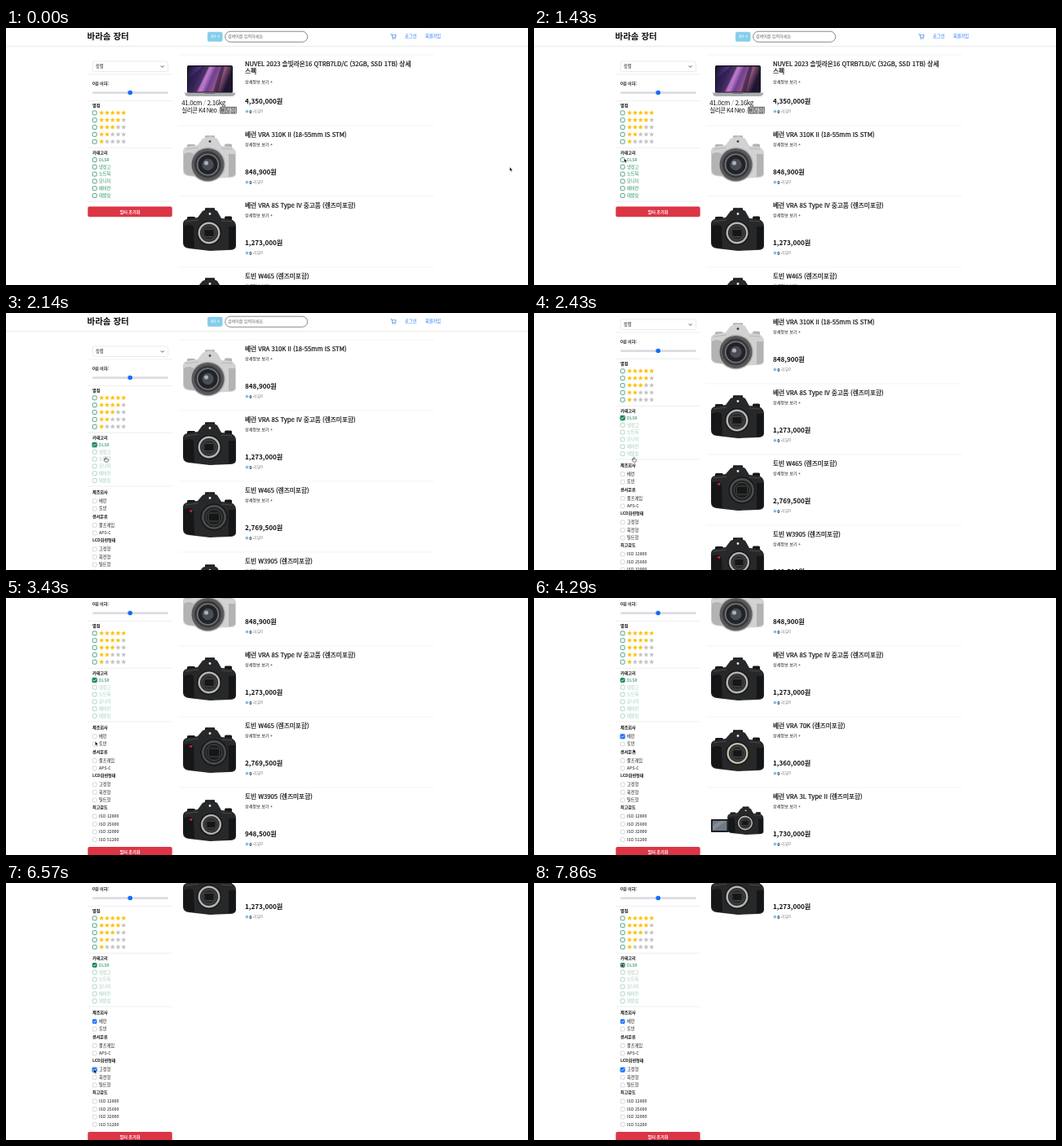
These frames come from a looping animation (640 by 316 pixels, 8 s). An HTML page:

```html
<!DOCTYPE html>
<html lang="ko">
<head>
<meta charset="utf-8">
<title>바라솜 장터</title>
<style>
  html, body { margin: 0; width: 100%; height: 100%; overflow: hidden; background: #fff; }
  svg { display: block; width: 100%; height: 100%; }
  text { font-family: "Noto Sans CJK KR", "Noto Sans CJK", "Noto Sans", sans-serif; white-space: pre; }
  .b { font-weight: 700; }
  .m { stroke: currentColor; stroke-width: .22px; color: #111; }
  .dim { opacity: .45; }
</style>
</head>
<body>
<svg id="stage" viewBox="0 0 640 316"></svg>
<script>
const INK = '#161616', GREEN = '#198754', BLUE = '#0d6efd', GRAY = '#c4c8cc', GOLD = '#ffc107';
const STEPS = 56, STEP_MS = 1000 / 7;

// ---- drawing helpers; y is the vertical centre of a text line ----
const text = (x, y, str, size = 5.1, fill = INK, more = '') =>
  `<text x="${x}" y="${y + size * .36}" font-size="${size}" fill="${fill}" ${more}>${str}</text>`;
const bold = (x, y, str, size, fill, more = '') => text(x, y, str, size, fill, 'class="b" ' + more);
const rect = (x, y, w, h, r, fill, more = '') =>
  `<rect x="${x}" y="${y}" width="${w}" height="${h}" rx="${r}" fill="${fill}" ${more}/>`;
const circle = (x, y, r, fill, more = '') => `<circle cx="${x}" cy="${y}" r="${r}" fill="${fill}" ${more}/>`;
const path = (d, fill, more = '') => `<path d="${d}" fill="${fill}" ${more}/>`;
const line = (x1, x2, y, color) => path(`M${x1} ${y}H${x2}`, 'none', `stroke="${color}" stroke-width=".7"`);
const star = (x, y, fill, scale = 1) =>
  `<use href="#star" transform="translate(${x} ${y}) scale(${scale})" fill="${fill}"/>`;
const starPoints = Array.from({ length: 10 }, (_, i) => {
  const r = i % 2 ? 1.45 : 3.2, a = i * Math.PI / 5;
  return `${(r * Math.sin(a)).toFixed(2)},${(-r * Math.cos(a)).toFixed(2)}`;
}).join(' ');

const box = (y, color) => rect(106.2, y - 2.4, 4.9, 4.9, 1.2, '#fff', `stroke="${color}" stroke-width=".75"`);
const tick = (id, y, color) => `<g id="${id}">
  ${rect(104.8, y - 3.8, 7.7, 7.7, 2.2, color, `id="${id}Ring" opacity=".28"`)}
  ${rect(105.9, y - 2.7, 5.5, 5.5, 1.3, color)}
  ${path(`M107.2 ${y + .1}l1.1 1.1 2-2.3`, 'none', 'stroke="#fff" stroke-width=".85" stroke-linecap="round"')}</g>`;

// ---- page header ----
function header() {
  return bold(99.5, 10.3, '바라솜 장터', 10.5, '#111') +
    rect(247, 4.7, 18.5, 12, 2, '#87ceeb') + text(251.3, 10.6, 'All', 4.9, '#fff') +
    path('M259 9.8h2.8l-1.4 1.7z', '#fff') +
    rect(268.7, 4.2, 101, 13, 6.5, '#fff', 'stroke="#555" stroke-width=".7"') +
    text(272, 10.6, '검색어를 입력하세요.', 5, '#666') +
    path('M471.6 7.6h1.3l1 4.1h3.6l.8-3h-5', 'none', 'stroke="#2f80e0" stroke-width=".7"') +
    circle(474.3, 13, .7, '#2f80e0') + circle(477, 13, .7, '#2f80e0') +
    text(489, 10.4, '로그인', 5.3, BLUE) + text(514, 10.4, '회원가입', 5.2, BLUE) +
    line(0, 640, 22.3, '#dedede') + line(0, 640, 23, '#f2f2f2');
}

// ---- filter column ----
function filters() {
  let s = rect(106.2, 41, 92.4, 12.6, 2, '#fff', 'stroke="#dee2e6" stroke-width=".7"') +
    text(110, 47.3, '정렬', 5.2) +
    path('M189.8 46.4l1.9 1.9 1.9-1.9', 'none', 'stroke="#333" stroke-width=".8"') +
    [57, 89.5, 147.3, 213].map(y => line(100, 204, y, '#e6e8ea')).join('') +
    bold(106, 68.4, '0원 이하:') +
    rect(106, 78.2, 93, 2.7, 1.3, '#d9dde1') + circle(152.2, 79.5, 2.8, BLUE) +
    bold(106, 95.6, '별점');
  for (let row = 0; row < 5; row++) {
    const y = 104.3 + row * 8.85;
    s += box(y, GREEN);
    for (let i = 0; i < 5; i++) s += star(117.2 + i * 6.75, y, i < 5 - row ? GOLD : '#c3c3c3');
  }
  s += bold(106, 153.5, '카테고리');
  const item = (label, i) => box(162 + i * 8.8, GREEN) + text(114, 162 + i * 8.8, label, 5.2, GREEN);
  s += item('DLSR', 0) + tick('dslr', 162, GREEN) + '<g id="others">' +
    ['냉장고', '노트북', '모니터', '에어컨', '태블릿'].map((label, i) => item(label, i + 1)).join('') + '</g>';
  return s;
}

function details() {
  const groups = [
    [220.2, '제조회사', ['베런', '토빈']],
    [250, '센서분류', ['풀프레임', 'APS-C']],
    [279.5, 'LCD화면형태', ['고정형', '회전형', '틸트형']],
    [318.6, '최고감도', ['ISO 12800', 'ISO 25600', 'ISO 32000', 'ISO 51200']]
  ];
  return groups.map(([y, title, labels]) => bold(106, y, title) + labels.map((label, i) => {
    const rowY = y + 10.9 + i * 9.5;
    return box(rowY, GRAY) + text(114, rowY, label, 5.2);
  }).join('')).join('') + tick('maker', 231.3, BLUE) + tick('screen', 290.6, BLUE);
}

const resetButton = rect(100.3, 219.5, 103.4, 12.8, 2, '#dc3545') +
  bold(152, 225.9, '필터 초기화', 5.1, '#fff', 'text-anchor="middle"');

// ---- product pictures, relative to the title line ----
function laptop() {
  return rect(6, 2, 56, 34, 2, '#17151d') + rect(7.3, 3.4, 53.4, 31, .6, 'url(#wall)') +
    path('M7.3 34V18L25 3.4h8L18 34.4zM38 34.4L48 3.4h4L44 34.4z', '#1d1738', 'opacity=".6"') +
    path('M3 35.5H65.5L64 39Q63 40 60 40H8Q5 40 4 39z', '#a9abae') +
    rect(28, 35.5, 12, 1.4, .6, '#77797d') +
    text(-.8, 48, '41.0cm <tspan fill="#999">/</tspan> 2.16kg', 8, INK, 'letter-spacing="-.35"') +
    text(-.8, 57, '실리콘 K4 Neo <tspan fill="#999">/</tspan>', 7.6, INK, 'letter-spacing="-.55"') +
    rect(46.3, 52.8, 20.7, 8.6, .8, '#777') + text(47.3, 57, '그레이', 7.3, '#fff', 'letter-spacing="-.3"');
}

function camera({ tone, shade, top, shoulder: s, bottom: b, cx, cy, r, rim, core, accent, mark = '#e8e8e8', lens }) {
  const body = `M1 ${s + 6}Q1 ${s + 1} 6 ${s}L19 ${s - 2}L25 ${top + 3}Q34 ${top - 2} 43 ${top + 3}L48 ${s - 1}` +
    `L59 ${s}Q66 ${s + 2} 66 ${s + 9}V${b - 6}Q66 ${b - 1} 58 ${b - 1}L34 ${b}L8 ${b - 3}Q1 ${b - 4} 1 ${b - 10}Z`;
  return rect(6, s - 3, 10, 5, 1.5, shade) + rect(52, s - 3.5, 9, 5, 1.5, shade) +
    rect(28, top - .8, 12, 3, .8, shade) + path(body, tone) +
    path(`M2 ${s + 9}Q9 ${s + 5} 14 ${s + 9}L15 ${b - 3}L8 ${b - 4}Q2 ${b - 5} 2 ${b - 10}Z`, shade) +
    path(`M57 ${s + 9}H65V${b - 5}Q64 ${b - 2} 57 ${b - 2}Z`, shade) +
    path(`M4 ${s + 3}L20 ${s + 1}M48 ${s + 2}L61 ${s + 3}`, 'none', 'stroke="#888" stroke-width=".6" opacity=".6"') +
    circle(34, top + 6.5, 1.4, mark) +
    (accent ? path(`M8 ${s + 10}l5-1.5-1.5 4z`, accent) : '') +
    circle(cx, cy, r + 1.5, shade) + circle(cx, cy, r, rim) + circle(cx, cy, r * .82, core) +
    (lens
      ? circle(cx, cy, r * .68, '#77777a') + circle(cx, cy, r * .6, '#222327') +
        circle(cx, cy, r * .36, '#4a4d55') + circle(cx - 2, cy - 2, r * .13, '#aab0bb')
      : circle(cx, cy, r * .66, 'none', 'stroke="#55575b" stroke-width=".8"') +
        rect(cx - r * .45, cy - r * .33, r * .9, r * .66, 1, shade, 'stroke="#66605a" stroke-width=".6"'));
}

const black = { tone: '#27282a', shade: '#151617', rim: '#b5b5b3', core: '#2b2b2d' };
const whiteCamera = camera({ tone: '#d2d2d2', shade: '#b3b3b5', top: 2, shoulder: 15, bottom: 54,
  cx: 31.5, cy: 37, r: 20, rim: '#59595c', core: '#39393c', mark: '#444', lens: true });
const fullFrame = camera({ ...black, top: 4, shoulder: 17, bottom: 56, cx: 33, cy: 34, r: 13.5 });
const capped = camera({ ...black, top: 3, shoulder: 15, bottom: 58, cx: 39, cy: 33, r: 15,
  rim: '#4c4d4f', core: '#1d1e1f', accent: '#c8242c' });
const compact = camera({ ...black, top: 5, shoulder: 18, bottom: 55, cx: 35.5, cy: 34.5, r: 12.5, accent: '#c8242c' });
const midRange = camera({ ...black, top: 6, shoulder: 18, bottom: 56, cx: 33.5, cy: 34, r: 13, rim: '#c5bda9' });
const flipScreen = `<g transform="translate(20.5 10.5) scale(.68 .65)">${fullFrame}</g>` +
  rect(1, 28, 21.5, 16, 1, '#202124') + rect(3, 30, 17.5, 12, .4, '#707a84') +
  path('M3 42V36L13 30h7.5z', '#96a0a8', 'opacity=".5"');

// ---- products: picture, price, title lines ----
const products = {
  laptop: [laptop(), '4,350,000', 'NUVEL 2023 솔빛라온16 QTRB7LD/C (32GB, SSD 1TB) 상세', '스펙'],
  white: [whiteCamera, '848,900', '베런 VRA 310K II (18-55mm IS STM)'],
  full: [fullFrame, '1,273,000', '베런 VRA 8S Type IV 중고품 (렌즈미포함)'],
  capped: [capped, '2,769,500', '토빈 W465 (렌즈미포함)'],
  compact: [compact, '948,500', '토빈 W3905 (렌즈미포함)'],
  mid: [midRange, '1,360,000', '베런 VRA 70K (렌즈미포함)'],
  flip: [flipScreen, '1,730,000', '베런 VRA 3L Type II (렌즈미포함)']
};

function product([id, [picture, price, ...titles]]) {
  const extra = (titles.length - 1) * 9.6;
  return `<g id="${id}">${line(212, 525, -11, '#f0f0f0')}<g transform="translate(216 0)">${picture}</g>` +
    titles.map((t, i) => text(293, i * 9.6, t, 7.7, '#111', 'class="m"')).join('') +
    text(293, 12.5 + extra, '상세정보 보기 +') +
    bold(293, 45.8, price + '원', 8.1, '#111') +
    star(295.4, 58.6, '#5bb8e8', .8) + bold(298.3, 58.6, '0', 5.3) + text(303, 58.6, '리뷰0', 5.1, '#8a8a8a') + '</g>';
}

document.getElementById('stage').innerHTML = `<defs>
  <polygon id="star" points="${starPoints}"/>
  <linearGradient id="wall" x2="1" y2=".25">
    <stop offset="0" stop-color="#19142b"/><stop offset=".3" stop-color="#55388e"/>
    <stop offset=".5" stop-color="#c27bc9"/><stop offset=".62" stop-color="#6b3f93"/>
    <stop offset=".8" stop-color="#a35a86"/><stop offset="1" stop-color="#1c1630"/>
  </linearGradient></defs>
  <g id="page">${header()}${filters()}<g id="details">${details()}</g><g id="reset">${resetButton}</g>
  ${Object.entries(products).map(product).join('')}</g>
  <g id="pointer">
    <g id="arrow">${path('M0 0V5.2L1.3 4.1L2.1 5.9L3 5.5L2.2 3.8H3.8Z', '#000', 'stroke="#fff" stroke-width=".5"')}</g>
    <g id="hand">${path('M-.6 .2Q0-.6 .6 .2V2L2.6 2.5Q3.1 2.8 2.9 4L2.4 5.6H-.7L-2.2 3.5Q-2-.1-.6 3Z', '#fff',
      'stroke="#222" stroke-width=".6" stroke-linejoin="round"')}</g>
  </g>`;

// ---- motion, in steps of a seventh of a second ----
const pointerKeys = [
  [0, 617.5, 171], [1, 596, 170], [2, 596, 170], [3, 545, 168], [4, 420, 165], [6, 180, 161],
  [7, 130, 160], [9, 110.5, 160.3], [12, 110.5, 160.3], [15, 122.5, 177.5], [18, 122.5, 177.5],
  [22, 109, 178], [24, 109.3, 176.3], [26, 107.8, 169], [28, 107.8, 169], [31, 128.5, 194],
  [34, 135.3, 205.3], [37, 135.3, 205.3], [40, 118, 235], [43, 107.7, 229], [46, 107.7, 229],
  [52, 106.5, 84], [55, 107.2, 98.8]
];
const scrollKeys = [[0, 0], [15, 0], [16, 9], [17, 33], [18, 61]];
const listKeys = [
  [0, ['laptop', 'white', 'full', 'capped']], [13, ['white', 'full', 'capped', 'compact']],
  [28, ['white', 'full', 'mid', 'flip']], [46, ['full']]
];

function valueAt(keys, step) {
  const next = keys.findIndex(k => k[0] > step);
  if (next < 0) return keys[keys.length - 1].slice(1);
  const a = keys[next - 1], b = keys[next], f = (step - a[0]) / (b[0] - a[0]);
  return a.slice(1).map((v, i) => v + (b[i + 1] - v) * f);
}

const el = id => document.getElementById(id);
const show = (id, on) => el(id).style.display = on ? '' : 'none';
const move = (id, x, y) => el(id).setAttribute('transform', `translate(${x} ${y})`);

function render(step) {
  const list = listKeys.filter(k => k[0] <= step).pop()[1];
  for (const id in products) {
    const place = list.indexOf(id);
    show(id, place >= 0);
    move(id, 0, 44 + place * 87);
  }
  const filtered = step >= 13;
  show('details', filtered);
  move('reset', 0, filtered ? 147.5 : 0);
  el('others').setAttribute('class', filtered ? 'dim' : '');
  show('dslr', step >= 12);
  show('dslrRing', step < 27);
  show('maker', step >= 27);
  show('makerRing', step < 44);
  show('screen', step >= 44);
  move('page', 0, -valueAt(scrollKeys, step)[0]);
  move('pointer', ...valueAt(pointerKeys, step));
  const pointing = step >= 13 && step < 20;
  show('hand', pointing);
  show('arrow', !pointing);
}

const start = performance.now();
function tickFrame() {
  render(Math.floor((performance.now() - start) / STEP_MS + .05) % STEPS);
  requestAnimationFrame(tickFrame);
}
tickFrame();
</script>
</body>
</html>
```
